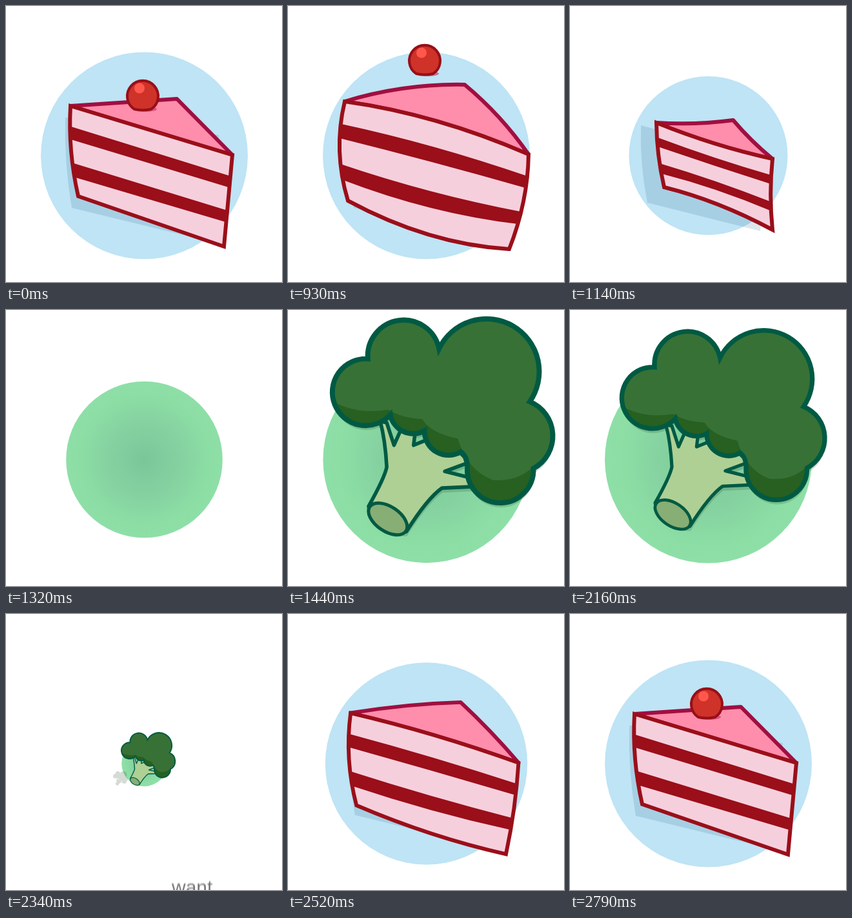
Recreate the animation shown at these times as an HTML page. Size 428 by 428 pixels, loop 2.97 s.

```html
<!DOCTYPE html>
<html lang="en">
<head>
<meta charset="utf-8">
<title>Cake and broccoli</title>
<style>
html, body { margin: 0; width: 100%; height: 100%; overflow: hidden; background: #fff; }
svg { display: block; width: 100vw; height: 100vh; }
</style>
</head>
<body>
<svg viewBox="0 0 428 428">
  <defs>
    <radialGradient id="mint">
      <stop offset="0" stop-color="#7ac69a"/>
      <stop offset=".5" stop-color="#86d3a1"/>
      <stop offset=".85" stop-color="#8cdea5"/>
      <stop offset="1" stop-color="#8edfa7"/>
    </radialGradient>
    <filter id="soft"><feGaussianBlur stdDeviation=".4 1.3"/></filter>
    <path id="crown" d="M134 94A49.6 49.6 0 0 1 232 80A72.6 72.6 0 1 1 357 153A51 51 0 0 1 362 245
      A45.6 45.6 0 1 1 271 243Q271 229 262 222A33 33 0 0 1 212 193A32 32 0 0 1 165 171A46 46 0 1 1 134 94Z"/>
    <path id="stem" d="M151 180Q158 206 160 243Q157 258 135 297C138 316 162 334 187 332
      Q216 286 236 272L280 270L272 257L240 249L275 236L240 205L214 206L197 213L199 196L182 186L170 213L160 182Z"/>
    <clipPath id="inCrown"><use href="#crown"/></clipPath>
  </defs>

  <circle id="disc" cx="214.5" cy="232"/>

  <g id="cake">
    <path id="cakeShade" fill="#1e5a82" opacity=".15"/>
    <path id="top" fill="#ff8dac" stroke="#a00f40" stroke-width="6" stroke-linejoin="round"/>
    <path id="front" fill="#f6cfdd"/>
    <path id="bands" fill="#9a0f19"/>
    <path id="edge" fill="none" stroke="#9a0f19" stroke-width="6"/>
  </g>

  <g id="cherry">
    <ellipse cx="217" cy="160" rx="17" ry="4" fill="#c73b68" opacity=".65"/>
    <path d="M199 160A24 24 0 1 1 225 160Q212 163 199 160Z" fill="#cf3229" stroke="#970f18" stroke-width="4"/>
    <circle cx="207" cy="127.5" r="8" fill="#ff574b"/>
  </g>

  <g id="sproutShade" fill="#2c5030" opacity=".2"><use href="#stem"/><use href="#crown"/></g>
  <g id="sprout" stroke="#005a43" stroke-linejoin="round">
    <use href="#stem" fill="#aed095" stroke-width="5"/>
    <ellipse cx="161.5" cy="314.5" rx="30" ry="17" transform="rotate(34 161.5 314.5)" fill="#87ae74" stroke-width="4.5"/>
    <use href="#crown" fill="#377136" stroke="none"/>
    <path clip-path="url(#inCrown)" fill="#276020" stroke="none"
      d="M78 148Q115 172 162 164Q182 176 209 177Q220 196 258 204Q270 247 306 261Q345 264 368 236V300H78Z"/>
    <use href="#crown" fill="none" stroke-width="7" stroke-linejoin="miter"/>
  </g>

  <text id="word" x="257" font-family="'Liberation Sans', Arial, sans-serif" font-size="30" fill="#777" filter="url(#soft)">want</text>
</svg>
<script>
const LOOP = 2970, STEP = 30;
const el = id => document.getElementById(id);
const set = (id, d) => el(id).setAttribute('d', d);
const span = (t, a, b) => Math.max(0, Math.min(1, (t - a) / (b - a)));
const lerp = (a, b, u) => a + (b - a) * u;
const mix = (p, q, u) => p.map((v, i) => lerp(v, q[i], u));

const easeOut = u => 1 - (1 - u) ** 3;
const backOut = u => 1 + 3.5 * (u - 1) ** 3 + 2.5 * (u - 1) ** 2;
const spring = u => 1 - (1 - u) * Math.exp(-u) * Math.cos(3 * Math.PI * u);

// Cake corners (left, apex, right, low right, low left): pinched, at rest, swollen
const poses = [
  [[134, 181], [253, 177], [314, 237], [314, 347], [146, 281]],
  [[100, 155], [265, 144], [351, 231], [338, 373], [112, 295]],
  [[88, 148], [274, 122], [373, 230], [343, 377], [93, 302]]
];
const bulges = [-0.4, 0, 1];
// Band borders as fractions of the left and right sides
const bandRows = [[0.225, 0.23], [0.37, 0.355], [0.63, 0.605], [0.79, 0.735]];
const shades = [
  [[110, 185], [120, 305], [295, 349], [310, 240]],
  [[92, 173], [102, 313], [328, 368], [330, 200]]
];

// Control point: the middle of a and b, moved by (dx, dy)
const bend = (a, b, dx, dy) => [(a[0] + b[0]) / 2 + dx, (a[1] + b[1]) / 2 + dy];
const onCurve = (a, q, b, u) => mix(mix(a, q, u), mix(q, b, u), u);

function shapeCake(p) {
  const i = p < 1 ? 0 : 1, u = p - i;
  const [A, B, C, D, E] = poses[i].map((pt, n) => mix(pt, poses[i + 1][n], u));
  const k = lerp(bulges[i], bulges[i + 1], u);
  const left = bend(A, E, -10 - 11 * k, 0), right = bend(C, D, 14 * k, 0);
  const row = (a, b, f) => bend(a, b, 0, lerp(-21, 30, f) * k);
  const roof = row(A, C, 0), base = row(E, D, 1);

  set('top', `M${A}Q${bend(A, B, 0, -15 * k)} ${B}Q${bend(B, C, 7 * k, -7 * k)} ${C}Q${roof} ${A}Z`);
  const face = `M${A}Q${roof} ${C}Q${right} ${D}Q${base} ${E}Q${left} ${A}Z`;
  set('front', face);
  set('edge', face);

  const lines = bandRows.map(([l, r]) => {
    const a = onCurve(A, left, E, l), b = onCurve(C, right, D, r);
    return [a, row(a, b, (l + r) / 2), b];
  });
  const band = ([a, q, b], [c, r, d]) => `M${a}Q${q} ${b}L${d}Q${r} ${c}Z`;
  set('bands', band(lines[0], lines[1]) + band(lines[2], lines[3]));

  const s = shades[0].map((pt, n) => mix(pt, shades[1][n], Math.min(1, p)));
  set('cakeShade', `M${s[0]}Q${bend(s[0], s[1], -7, 0)} ${s[1]}L${s[2]}L${s[3]}Z`);
}

function place(id, s, x, y, dx = 0, dy = 0, sy = s) {
  el(id).setAttribute('display', s > 0.005 ? 'inline' : 'none');
  el(id).setAttribute('transform', `translate(${x + dx} ${y + dy}) scale(${s} ${sy}) translate(${-x} ${-y})`);
}

function drawDisc(t) {
  let s;
  if (t < 1230) s = 1 - span(t, 1020, 1230) ** 2.6;
  else if (t < 1800) s = easeOut(span(t, 1230, 1470));
  else if (t < 2370) s = 1 - span(t, 2190, 2370) ** 1.36;
  else s = easeOut(span(t, 2370, 2580));
  el('disc').setAttribute('r', 160.5 * s);
  el('disc').setAttribute('fill', t >= 1230 && t < 2370 ? 'url(#mint)' : '#bee4f5');
}

function drawCake(t) {
  const leaving = t < 1800;
  let pose = 1;
  if (!leaving) pose = spring(span(t, 2430, 2670));
  else if (t >= 930) pose = 2 - 2 * span(t, 930, 1140) ** 2;
  shapeCake(pose);
  place('cake', leaving ? 1 - span(t, 1140, 1230) ** 1.5 : easeOut(span(t, 2430, 2550)), 214.5, 236);
}

function drawCherry(t) {
  let s = 1, dy = 0;
  if (t >= 930 && t < 1800) {
    const u = span(t, 930, 1110);
    s = 1 - u ** 3;
    dy = -55 - 60 * u + 125 * u * u;
  } else if (t >= 1800) {
    const u = span(t, 2550, 2670);
    s = Math.min(1, 2 * u);
    dy = -70 * (1 - u * u);
  }
  const squash = 0.16 * Math.sin(Math.PI * span(t, 2670, 2790));
  place('cherry', s * (1 + squash), 212, 162, 0, dy, s * (1 - squash));
}

function drawSprout(t) {
  const s = backOut(t < 1800 ? span(t, 1330, 1620) : 1 - span(t, 2130, 2352));
  const k = Math.min(s, s * s);
  const drift = Math.max(0, 1 - k);
  place('sprout', s, 214.5, 239);
  place('sproutShade', k, 214.5, 239, 1 - 43 * drift, 7 + 14 * drift);
}

function draw(t) {
  drawDisc(t);
  drawCake(t);
  drawCherry(t);
  drawSprout(t);
  el('word').setAttribute('y', 434 + 1.2 * Math.abs(t - 2340));
}

const start = performance.now();
function tick(now) {
  const t = Math.max(0, now - start) % LOOP;
  draw(Math.floor(t / STEP) * STEP);
  requestAnimationFrame(tick);
}
draw(0);
requestAnimationFrame(tick);
</script>
</body>
</html>
```
